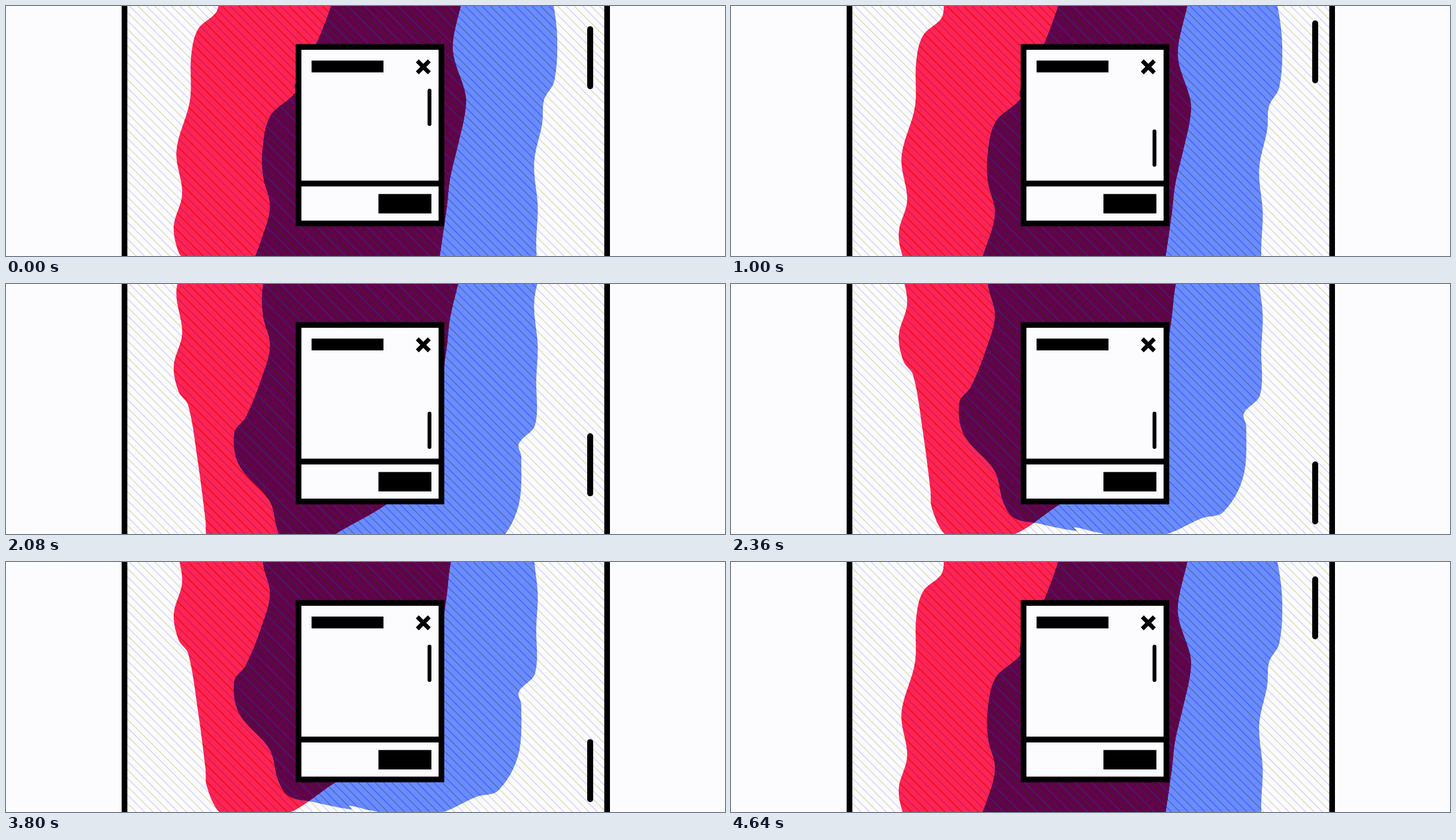
An HTML page for the animation above (4740 ms loop, 1200x417 px).

```html
<!DOCTYPE html>
<html lang="en">
<head>
<meta charset="utf-8">
<title>Scrolling page and dialog</title>
<style>
  html, body { margin: 0; width: 100%; height: 100%; overflow: hidden; background: #fcfcff; }
  svg { display: block; width: 100vw; height: 100vh; }
  .stripes { mix-blend-mode: difference; }
</style>
</head>
<body>
<svg viewBox="0 0 1200 417">
  <defs>
    <pattern id="lines" width="20" height="19.8" patternUnits="userSpaceOnUse" patternTransform="rotate(45)">
      <rect y="2" width="20" height="1.2" fill="#2c2c5a"/>
      <rect y="11.9" width="20" height="1.2" fill="#3a3a00"/>
    </pattern>
    <clipPath id="redClip"><path id="redClipPath"/></clipPath>
  </defs>
  <rect width="1200" height="417" fill="#fcfcff"/>
  <g id="page">
    <path id="red" fill="#ff2454"/>
    <path id="blue" fill="#6b8cff"/>
    <path id="overlap" fill="#62004f" clip-path="url(#redClip)"/>
  </g>
  <rect class="stripes" x="198" width="805" height="417" fill="url(#lines)"/>
  <rect x="193" width="9.5" height="417"/>
  <rect x="998.5" width="9.5" height="417"/>
  <rect id="pageBar" x="970" width="10" height="105" rx="5"/>

  <rect x="488.3" y="68.3" width="238.4" height="294.4" fill="#fcfcff" stroke="#000" stroke-width="9.5"/>
  <rect x="488" y="291.3" width="239" height="9.7"/>
  <rect x="510" y="91" width="120" height="19.7"/>
  <path d="M686.5 91.5l20 20m0 -20l-20 20" stroke="#000" stroke-width="7"/>
  <rect x="621.6" y="313.6" width="88.4" height="32.4"/>
  <rect id="boxBar" x="703.6" width="6.4" height="62" rx="3.2"/>
</svg>
<script>
const $ = id => document.getElementById(id);

// Key points of the two blobs, x,y in page coordinates
const RED = `354,-60 355,5 350,22 320,50 309,95 307,168 284.5,252 294,324 280,378 288,421
  304,444 320,537 333,637 335,665 357,709 400,725 474,709 548,660 637,608 711,545
  716,486 736,345 741,300 755,240 766,190 767,158 746,86 746,-60`;
const BLUE = `565,-60 546,0 522,64 482,142 482,156 441,194 428,250 429,295 440.5,345
  425,403 400,464 381,490 389,544 440,604 454,655 472,682 510,691 577,704 573,698
  605,705 675,717 728,709 785,683 822,672 855,613 860,530 856,508 883,477 885,400
  887.5,345 881.5,272 895,206 898,167 915,136 920,65 912,0 895,-60`;

// Closed smooth curve; each handle is a third of its chord
function curve(text) {
  const pts = text.split(/\s+/).map(p => p.split(",").map(Number));
  const at = i => pts[(i + pts.length) % pts.length];
  const gap = (a, b) => Math.hypot(b[0] - a[0], b[1] - a[1]);
  const handle = (i, len) => {
    const a = at(i - 1), b = at(i), c = at(i + 1), k = len / gap(a, c);
    return [b[0] + (c[0] - a[0]) * k, b[1] + (c[1] - a[1]) * k];
  };
  let d = "M" + pts[0];
  pts.forEach((p, i) => {
    const len = gap(p, at(i + 1)) / 3;
    d += "C" + [handle(i, len), handle(i + 1, -len), at(i + 1)].join(" ");
  });
  return d + "Z";
}

for (const id of ["red", "redClipPath"]) $(id).setAttribute("d", curve(RED));
for (const id of ["blue", "overlap"]) $(id).setAttribute("d", curve(BLUE));

// cubic-bezier(.42, 0, .58, 1)
function ease(x) {
  if (x <= 0) return 0;
  if (x >= 1) return 1;
  let lo = 0, hi = 1;
  for (let i = 0; i < 24; i++) {
    const t = (lo + hi) / 2, s = 1 - t;
    if (3 * s * s * t * 0.42 + 3 * s * t * t * 0.58 + t * t * t < x) lo = t; else hi = t;
  }
  return lo * lo * (3 - 2 * lo);
}

const LOOP = 4740, BEAT = 560, TICK = 20, MOVE = 29;

// Each beat has 24 ticks; the last one is held
function tickAt(ms) {
  const t = ms % LOOP + TICK;
  const tick = Math.floor(t / BEAT) * 24 - 1 + Math.min(23, Math.floor(t % BEAT / TICK));
  return Math.min(tick, 200);
}

function draw(ms) {
  const tick = tickAt(ms);
  const move = start => ease((tick - start) / MOVE);
  const page = 1 - move(-25.1) + move(71.35) - move(165);
  const box = move(23.2) - move(117.8);
  $("page").setAttribute("transform", `translate(0 ${-292 * page})`);
  $("pageBar").setAttribute("y", 24 + 272 * page);
  $("boxBar").setAttribute("y", 138 + 75 * box);
}

let begin;
function loop(now) {
  begin ??= now;
  draw(Math.max(0, now - begin));
  requestAnimationFrame(loop);
}
draw(0);
requestAnimationFrame(loop);
</script>
</body>
</html>
```
